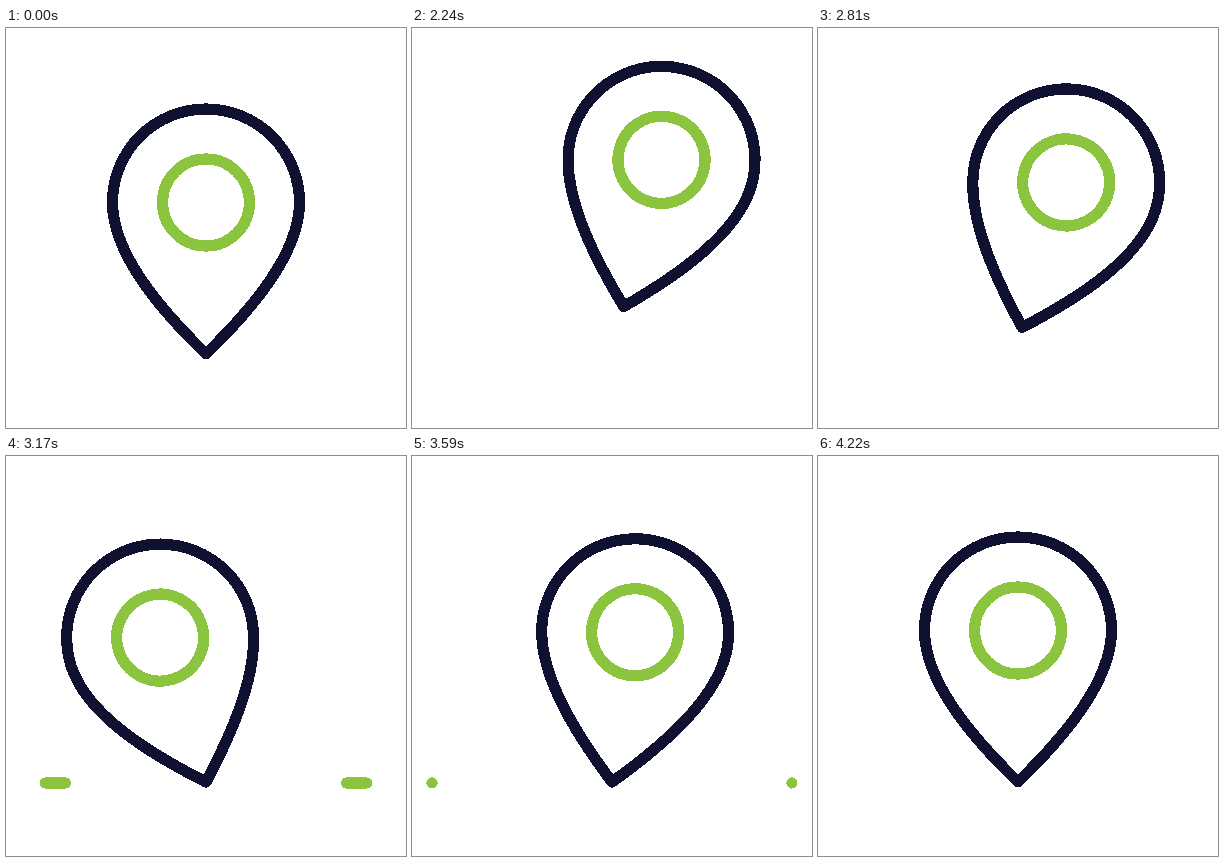
An HTML page that plays this animation: 400 px wide and 400 px high, repeating every 4490 ms.

```html
<!DOCTYPE html>
<html lang="en">
<head>
<meta charset="utf-8">
<title>Bouncing map pin</title>
<style>
  html, body { margin: 0; height: 100%; overflow: hidden; background: #fff; }
  svg { display: block; width: 100vw; height: 100vh; shape-rendering: crispEdges; }
  path, circle { fill: none; stroke: #8bc540; stroke-width: 11.2; stroke-linecap: round; stroke-linejoin: round; }
  #drop { stroke: #101130; }
</style>
</head>
<body>
<svg viewBox="0 0 400 400">
  <path id="dashes"/>
  <g id="pin">
    <path id="drop" d="M0 0C-45-44-93.5-100-93.5-151.5A93.5 93.5 0 0 1 93.5-151.5C93.5-100 45-44 0 0Z"/>
    <circle cy="-151.5" r="43.5"/>
  </g>
</svg>
<script>
  const LOOP = 4490, REST = 2000, STEP = 30;
  const PEAK = 19.5, LAND = 29.1, DASH_START = 30, DASH_END = 54;
  const TILT = 24;
  const pin = document.getElementById('pin');
  const dashes = document.getElementById('dashes');
  const clamp = v => Math.min(1, Math.max(0, v));

  // Swing after the peak: [step, degrees, degrees per step]
  const swing = [
    [PEAK, TILT, 0], [27, 16.9, -2.3], [37.5, -18.8, 0],
    [50, 11.1, 0], [62, -3.8, 0], [74, 0, 0]
  ];

  function swingAngle(k) {
    const i = swing.findIndex(key => key[0] > k);
    if (i < 0) return 0;
    const [k0, a0, v0] = swing[i - 1], [k1, a1, v1] = swing[i];
    const d = k1 - k0, u = (k - k0) / d, w = 1 - u;
    return w * w * ((1 + 2 * u) * a0 + u * d * v0) + u * u * ((1 + 2 * w) * a1 - w * d * v1);
  }

  // Distance a dash end still has to travel outward
  const remaining = (k, delay) => 104 * (1 - clamp((k - DASH_START - delay) / 21)) ** 3;

  function draw(t) {
    const k = Math.max(0, Math.floor((t - REST) / STEP));
    const rising = k < PEAK;
    const lift = rising
      ? Math.sin(Math.PI / 2 * k / PEAK)
      : Math.cos(Math.PI / 2 * clamp((k - PEAK) / (LAND - PEAK)));
    const angle = rising ? TILT * lift : swingAngle(k);
    const x = 200 + 29.5 * lift ** 1.8, y = 326 - 79 * lift;
    pin.setAttribute('transform', `translate(${x} ${y}) rotate(${angle})`);

    const outer = 20 + remaining(k, 0), inner = 20 + remaining(k, 3.2);
    const visible = k >= DASH_START && k < DASH_END;
    dashes.setAttribute('d', visible
      ? `M${outer} 327L${inner} 327M${400 - outer} 327L${400 - inner} 327` : '');
  }

  const start = performance.now();
  function tick() {
    draw((performance.now() - start) % LOOP);
    requestAnimationFrame(tick);
  }
  tick();
</script>
</body>
</html>
```
